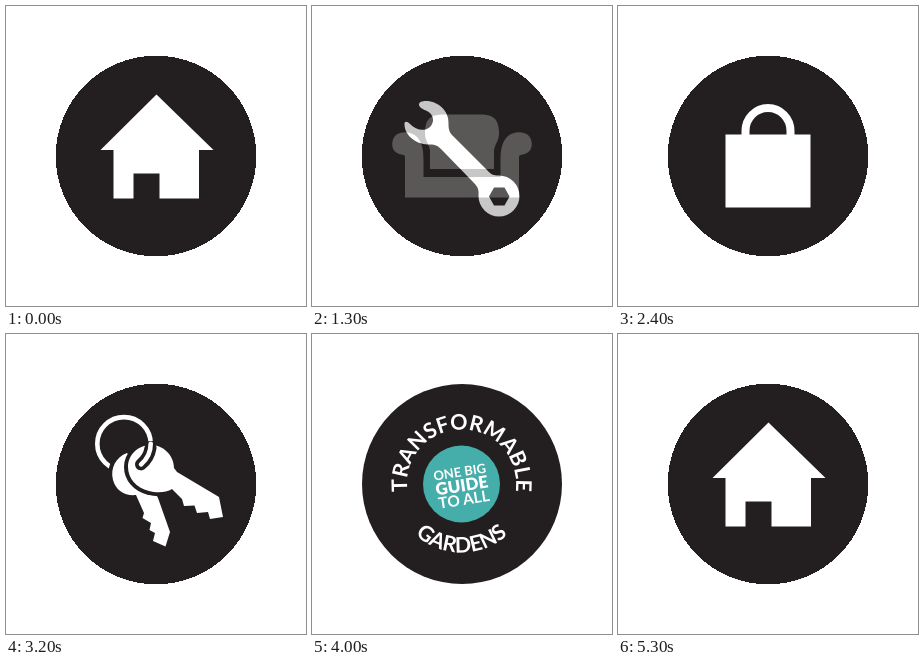
An HTML page that plays this animation: 300x300 px, repeating every 5400 ms.

```html
<!DOCTYPE html>
<html lang="en">
<head>
<meta charset="utf-8">
<title>Icon loop</title>
<style>
  html, body { margin: 0; width: 100%; height: 100%; overflow: hidden; background: #fff; }
  svg { display: block; width: 100vw; height: 100vh; }

  /* A stack of opaque badges: each one fades away at --out and uncovers the next.
     It returns while a higher badge hides it; home fades back over the title. */
  .badge { fill: #fff; }
  .fade { animation: fade 5400ms step-end calc(var(--out) - 5400ms) infinite; }
  .home { --out: 500ms; animation-name: fade-home; }
  .wrench { --out: 1300ms; }
  .sofa { --out: 2100ms; }
  .bag { --out: 2900ms; }
  .keys { --out: 3700ms; }

  @keyframes fade {
    0% { opacity: .75; } 1.85% { opacity: .5; } 3.7% { opacity: .25; } 5.55% { opacity: 0; }
    79.62%, 100% { opacity: 1; }
  }
  @keyframes fade-home {
    0% { opacity: .75; } 1.85% { opacity: .5; } 3.7% { opacity: .25; } 5.55% { opacity: 0; }
    83.33% { opacity: .25; } 85.18% { opacity: .5; } 87.03% { opacity: .75; }
    88.88%, 100% { opacity: 1; }
  }

  .dark { fill: #231f20; }
  .crisp { shape-rendering: crispEdges; }
  .line { fill: none; stroke: #fff; }
  .gap { stroke: #231f20; }
  .key { stroke: #231f20; stroke-width: 8; paint-order: stroke; }
  text { font: 700 21.5px Lato, sans-serif; text-anchor: middle; }
  .small { font-size: 13px; }
  .big { font-size: 17px; font-weight: 900; }
  .mid { font-size: 15.5px; }
</style>
</head>
<body>
<svg viewBox="0 0 300 300">
  <defs>
    <circle id="disc" class="dark crisp" cx="150" cy="150" r="100.300"/>
    <path id="upper" d="M149.5 204.5A54.5 54.5 0 1 1 149.6 204.5"/>
    <path id="lower" d="M149.5 81.5A68.5 68.5 0 1 0 149.6 81.5"/>
  </defs>

  <g class="badge">
    <circle class="dark" cx="150" cy="150" r="100"/>
    <circle cx="149.500" cy="150" r="38.500" fill="#45aeaa"/>
    <text><textPath href="#upper" startOffset="50%">TRANSFORMABLE</textPath></text>
    <text><textPath href="#lower" startOffset="50%">GARDENS</textPath></text>
    <g transform="translate(149.500 150) rotate(-9)">
      <text class="small" y="-7.500">ONE BIG</text>
      <text class="big" y="7.500">GUIDE</text>
      <text class="mid" y="21">TO ALL</text>
    </g>
  </g>

  <g class="badge fade keys">
    <use href="#disc"/>
    <circle class="line" stroke-width="4.600" cx="118" cy="109.800" r="26.700"/>
    <path class="key" d="M121 119C110 123 104 134 107 146C110 157 119 162 130 161L138 179L136.500 184L145 189L143.500 196L149 199L147 207L159.500 212.500L164 198L152 164L140 140Z"/>
    <path class="key" d="M145 111C157 111 168 121 168 134L171 138L213 163L217 183L204 185L202 178L191 179L188.500 171.500L178 172L176 165L166 155C160 159 150 159 143 157C130 154 122 144 122 133C122 121 132 111 145 111Z"/>
    <path class="line gap" stroke-width="12" stroke-linecap="round" d="M144.500 114A26.700 26.700 0 0 1 135 130.400"/>
    <path class="line" stroke-width="4.600" stroke-linecap="round" d="M144.700 109.800A26.700 26.700 0 0 1 135 130.400"/>
  </g>

  <g class="badge fade bag">
    <use href="#disc"/>
    <rect x="107.500" y="128.500" width="85" height="73"/>
    <path class="line" stroke-width="8" d="M127.500 130V125A22.500 23 0 0 1 172.500 125V130"/>
  </g>

  <g class="badge fade sofa">
    <use href="#disc"/>
    <path d="M118 163V144C117 138 113 135 113 127C113 114 118 109 129 108.500H171C182 109 187 114 187 127C187 135 183 138 182 144V163Z"/>
    <path d="M93 191.500V150C91 148 88 149 85 147C79 144 79 135 83 130C88 125 99 125 105 131C111 137 111.500 147 111.500 155V171H188.500V155C188.500 147 189 137 195 131C201 125 212 125 217 130C221 135 221 144 215 147C212 149 209 148 207 150V191.500Z"/>
  </g>

  <g class="badge fade wrench">
    <use href="#disc"/>
    <path d="M107 98.500C107 96 110 95 114 95C126 95 137 105 136.500 117C136.500 123 137 126 141 130L175 164C179 168.500 181 169.500 187 169.500A20.500 20.500 0 1 1 166.500 190C167 184 166 181 162 177L129 143C125 139 122 138.500 116 138.500C103 138 93 129 92.500 119C92 115 95 115 98 118C104 124 112 126 118 121C123 116 122 108 114 104.500C110 103 107 101 107 98.500Z"/>
    <path class="dark" d="M177 190.500L182 181.500H192.500L197.500 190.500L192.500 199.500H182Z"/>
  </g>

  <g class="badge fade home">
    <use href="#disc"/>
    <path d="M150.500 88.500L207.500 144H193V192.500H153.500V167.500H127.500V192.500H107.500V144H94.500Z"/>
  </g>
</svg>
</body>
</html>
```
